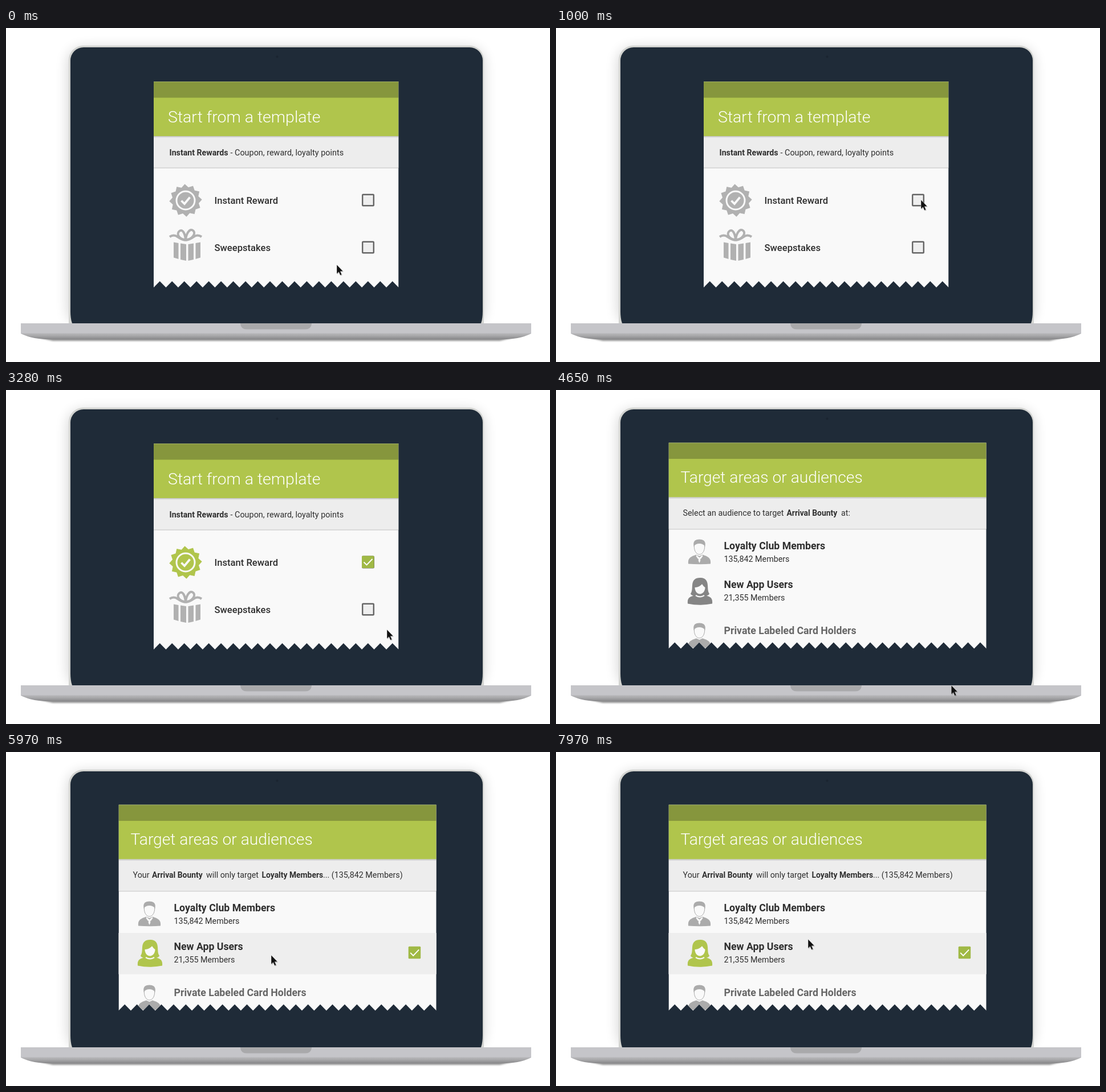
Animation of 954 by 587 pixels, one loop 8 s. Source, as an HTML page:

```html
<!DOCTYPE html>
<html lang="en">
<head>
<meta charset="utf-8">
<title>Campaign setup</title>
<style>
html, body { margin: 0; width: 100%; height: 100%; overflow: hidden; background: #fff; }
svg { display: block; width: 954px; height: 587px; font-family: Roboto, sans-serif; }
text { fill: #2f2f2f; white-space: pre; }
.title { font-size: 28.5px; font-weight: 300; fill: #fff; }
.note { font-size: 14.4px; }
.note .b { font-weight: 700; font-size: 14.2px; }
.item { font-size: 16.6px; font-weight: 500; }
.name { font-size: 17.7px; font-weight: 700; }
#audiences .title { font-size: 28.2px; }
#audiences .note { font-size: 14.3px; }
#audiences .b { font-size: 13.9px; }
</style>
</head>
<body>
<svg viewBox="0 0 954 587">
  <defs>
    <linearGradient id="under" x1="0" y1="0" x2="0" y2="1">
      <stop offset="0" stop-color="#bcbcbf"/><stop offset=".45" stop-color="#a9a9ab"/><stop offset="1" stop-color="#858587"/>
    </linearGradient>
    <linearGradient id="shade" x1="0" y1="0" x2="0" y2="1">
      <stop offset="0" stop-color="#000" stop-opacity=".2"/><stop offset="1" stop-color="#000" stop-opacity="0"/>
    </linearGradient>
    <filter id="soft" x="-10%" y="-10%" width="120%" height="120%"><feGaussianBlur stdDeviation="11"/></filter>
    <filter id="thin" x="-5%" y="-100%" width="110%" height="300%"><feGaussianBlur stdDeviation="1.6"/></filter>
    <clipPath id="clip1"><path id="cut1"/></clipPath>
    <clipPath id="clip2"><path id="cut2"/></clipPath>

    <g id="man">
      <path d="M232 305.500C231 296 235 293 246 289.500L251.500 292L257 289.500C268 293 272 296 271 305.500Q251.500 307 232 305.500Z" fill="currentColor"/>
      <path d="M242 276C239.500 267 243 262.500 251.500 262.500S263.500 267 261 276Z" fill="currentColor"/>
      <path d="M242.500 273C245 271 247 269.500 251.500 269.500S258 271 260.500 273C261.500 282 257 289 251.500 289S241.500 282 242.500 273Z" fill="#f9f9f9" stroke="currentColor"/>
    </g>
  </defs>

  <rect x="108" y="34" width="731" height="488" rx="28" fill="#000" opacity=".16" filter="url(#soft)"/>
  <rect x="0" y="549" width="954" height="38" fill="#fff"/>
  <path d="M110 519V56A25 25 0 0 1 135 31H813A25 25 0 0 1 838 56V519Z" fill="#d3d4d1"/>
  <path d="M116 519Q113 511 113 498V57A23 23 0 0 1 136 34H813A23 23 0 0 1 836 57V498Q836 511 833 519Z" fill="#1f2b38"/>
  <circle cx="475.500" cy="50.500" r="2" fill="#1a2430" stroke="#28364500" stroke-width=".8"/>
  <path d="M60 545H887L866 550H82Z" fill="#000" opacity=".4" filter="url(#thin)"/>
  <path d="M26 535H921V537Q901 547.500 864 547.500H83Q46 547.500 26 537Z" fill="url(#under)"/>
  <rect x="26" y="519" width="895" height="17.500" fill="#c5c5c9"/>
  <path d="M411 519H536V520Q535 529.500 525 529.500H422Q412 529.500 411 520Z" fill="#a9a9ab"/>

  <g id="templates">
    <g id="base1" clip-path="url(#clip1)"></g>
    <text class="title" x="284" y="165.500">Start from a template</text>
    <g class="note">
      <text class="b" x="286.500" y="224">Instant Rewards</text>
      <text x="393.500" y="224">- Coupon, reward, loyalty points</text>
    </g>
    <g id="badge">
      <path id="star" fill="currentColor"/>
      <circle cx="315" cy="303" r="16" fill="none" stroke="#f9f9f9" stroke-width="3"/>
      <path d="M307.500 303.500L313 309L322.500 297.500" fill="none" stroke="#f9f9f9" stroke-width="3.800"/>
    </g>
    <g fill="#b1b1b1">
      <path d="M294 376.500L302.500 378V406L294 403.500ZM306 378.500L316 380V409L306 407ZM319.500 380L329 378.500V407L319.500 409ZM332.500 378L341 376.500V403.500L332.500 406Z"/>
      <path d="M287 367Q294 362 301 367T315 373M343 367Q336 362 329 367T315 373M315 372C304 372 298 362 304 357S314 362 315 372C316 362 322 351 328 356S326 372 315 372" fill="none" stroke="#b1b1b1" stroke-width="4"/>
    </g>
    <text class="item" x="365.500" y="309">Instant Reward</text>
    <text class="item" x="365.500" y="392">Sweepstakes</text>
    <g fill="#efefef" stroke="#666" stroke-width="2.400">
      <rect x="625.200" y="292.700" width="19.600" height="19.600" rx="1"/>
      <rect x="625.200" y="375.700" width="19.600" height="19.600" rx="1"/>
    </g>
    <g id="tick1"></g>
    <circle id="ripple" cx="635" cy="302" r="28.500"/>
  </g>

  <g id="audiences">
    <g clip-path="url(#clip2)">
      <g id="base2"></g>
      <rect id="row" x="197" y="318" width="558" height="72.500" fill="#eee"/>
      <use href="#man" color="#ababab"/>
      <path d="M246.500 290L251.500 294.500L256.500 290L257.500 292L253.500 297.500L252.800 295.500L253.300 300L251.500 304L249.700 300L250.200 295.500L249.500 297.500L245.500 292Z" fill="#f9f9f9"/>
      <use href="#man" y="147" color="#ababab"/>
    </g>
    <g id="woman">
      <path d="M231 375.500C230 366 234 363.500 241 361.500Q237 360.500 236 358C239 354 238.500 349 239 343C239.500 334 244 330 252.500 330S265.500 334 266 343C266.500 349 266 354 269 358Q268 360.500 264 361.500C271 363.500 275 366 274 375.500Q252.500 380 231 375.500Z" fill="currentColor"/>
      <path d="M243.500 347Q252 346.500 256 341Q258.500 345 261.500 347C261.500 354 257 358.500 252.500 358.500S243.500 354 243.500 347Z" fill="#f9f9f9"/>
      <path d="M245.500 360Q252.500 364.500 259.500 360L260.500 362Q252.500 367 244.500 362Z" fill="#f9f9f9"/>
    </g>
    <text class="title" x="218.500" y="162.500">Target areas or audiences</text>
    <g class="note" id="ask">
      <text x="222.500" y="221">Select an audience to target</text>
      <text class="b" x="404.500" y="221">Arrival Bounty</text>
      <text x="500" y="221">at:</text>
    </g>
    <g class="note" id="answer">
      <text x="222.500" y="221">Your</text>
      <text class="b" x="256" y="221">Arrival Bounty</text>
      <text x="351" y="221">will only target</text>
      <text class="b" x="448.500" y="221">Loyalty Members</text>
      <text x="556" y="221">... (135,842 Members)</text>
    </g>
    <text class="name" x="294.500" y="280">Loyalty Club Members</text>
    <text class="note" x="294.500" y="301.500">135,842 Members</text>
    <text class="name" x="294.500" y="348">New App Users</text>
    <text class="note" x="294.500" y="369.500">21,355 Members</text>
    <text class="name" x="294.500" y="429" style="fill:#666">Private Labeled Card Holders</text>
    <g id="tick2"></g>
  </g>

  <g id="cursor">
    <path d="M1 1V17L4.600 13.800L7 19.500L9.700 18.300L7.300 12.800L12 12.400Z" fill="#000" opacity=".25"/>
    <path d="M0 0V16L3.600 12.800L6 18.500L8.700 17.300L6.300 11.800L11 11.400Z" fill="#111" stroke="#fff" stroke-opacity=".6" stroke-width=".7"/>
  </g>
</svg>
<script>
const $ = id => document.getElementById(id);
const LOOP = 8000, GREEN = '#b0c54c';

// Paper outline with a torn zigzag bottom edge
function paper(x, y, w, teeth) {
  const step = w / teeth;
  let d = `M${x} ${y}V${y + 362}`;
  for (let i = 0; i < teeth; i++) {
    d += `L${x + (i + .5) * step} ${y + 351}L${x + (i + 1) * step} ${y + 362}`;
  }
  return d + `V${y}Z`;
}

function panel(n, x, y, w, teeth) {
  const box = (top, h, fill) => `<rect x="${x}" y="${y + top}" width="${w}" height="${h}" fill="${fill}"/>`;
  $('cut' + n).setAttribute('d', paper(x, y, w, teeth));
  $('base' + n).innerHTML = box(0, 364, '#f9f9f9') + box(0, 29, '#86963d') + box(0, 1, '#9dab62') +
    box(28.5, 67.5, GREEN) + box(96, 56, '#ededed') + box(96, 3, 'url(#shade)') + box(151.5, 2, 'url(#shade)');
}

function tick(id, x, y) {
  $(id).innerHTML = `<g transform="translate(${x} ${y})"><rect width="21.500" height="21.500" rx="1.500" fill="#a0b945"/>` +
    '<path d="M3.500 11L8.500 16L18.500 5.500" fill="none" stroke="#fff" stroke-width="1.900"/></g>';
}

function star(cx, cy, points, outer, inner) {
  const at = i => {
    const a = (i * 180 / points - 3) * Math.PI / 180, r = i % 2 ? inner : outer;
    return (cx + r * Math.cos(a)).toFixed(2) + ' ' + (cy + r * Math.sin(a)).toFixed(2);
  };
  return 'M' + Array.from({ length: points * 2 }, (_, i) => at(i)).join('L') + 'Z';
}

panel(1, 259, 94, 429.5, 20);
panel(2, 197.5, 92.5, 557.2, 26);
tick('tick1', 624, 291.5);
tick('tick2', 705.7, 341.8);
$('star').setAttribute('d', star(315, 303, 12, 28.7, 23.5));

const clamp = v => Math.max(0, Math.min(1, v));
const span = (t, a, b) => clamp((t - a) / (b - a));
const smooth = p => p * p * (3 - 2 * p);
const out = p => 1 - (1 - p) * (1 - p);
const show = (id, on) => $(id).setAttribute('opacity', +on);

// Moves: start, end, from x, from y, to x, to y, easing
const moves = [
  [0, 810, 580, 416, 588, 309, smooth],
  [810, 1000, 588, 309, 640, 302, out],
  [2500, 3280, 640.5, 306, 668, 421, smooth],
  [4650, 4950, 694, 520, 570, 355, out],
  [5200, 5640, 570, 355, 465, 357, smooth],
  [7610, 7970, 465, 357, 442, 329, p => p * p * (1.6 - .6 * p)]
];

function draw(t) {
  const second = t >= 4650;
  show('templates', !second);
  show('audiences', second);

  const picked = t >= 2530;
  show('tick1', picked);
  $('badge').setAttribute('color', picked ? GREEN : '#b1b1b1');
  show('ripple', picked ? .1 * (1 - span(t, 2560, 2860)) : 0);

  const told = t >= 5430;
  show('row', t >= 4830);
  show('ask', !told);
  show('answer', told);
  const chosen = t >= 5970 ? 1 : t >= 5940 ? .5 : 0;
  show('tick2', chosen);
  $('woman').setAttribute('color', ['#858585', '#9ba569', GREEN][chosen * 2]);

  const [a, b, x0, y0, x1, y1, ease] = moves.filter(m => t >= m[0]).pop();
  const p = ease(span(t, a, b));
  $('cursor').setAttribute('transform', `translate(${x0 + (x1 - x0) * p} ${y0 + (y1 - y0) * p})`);
}

function frame() {
  draw(performance.now() % LOOP);
  requestAnimationFrame(frame);
}
frame();
</script>
</body>
</html>
```
